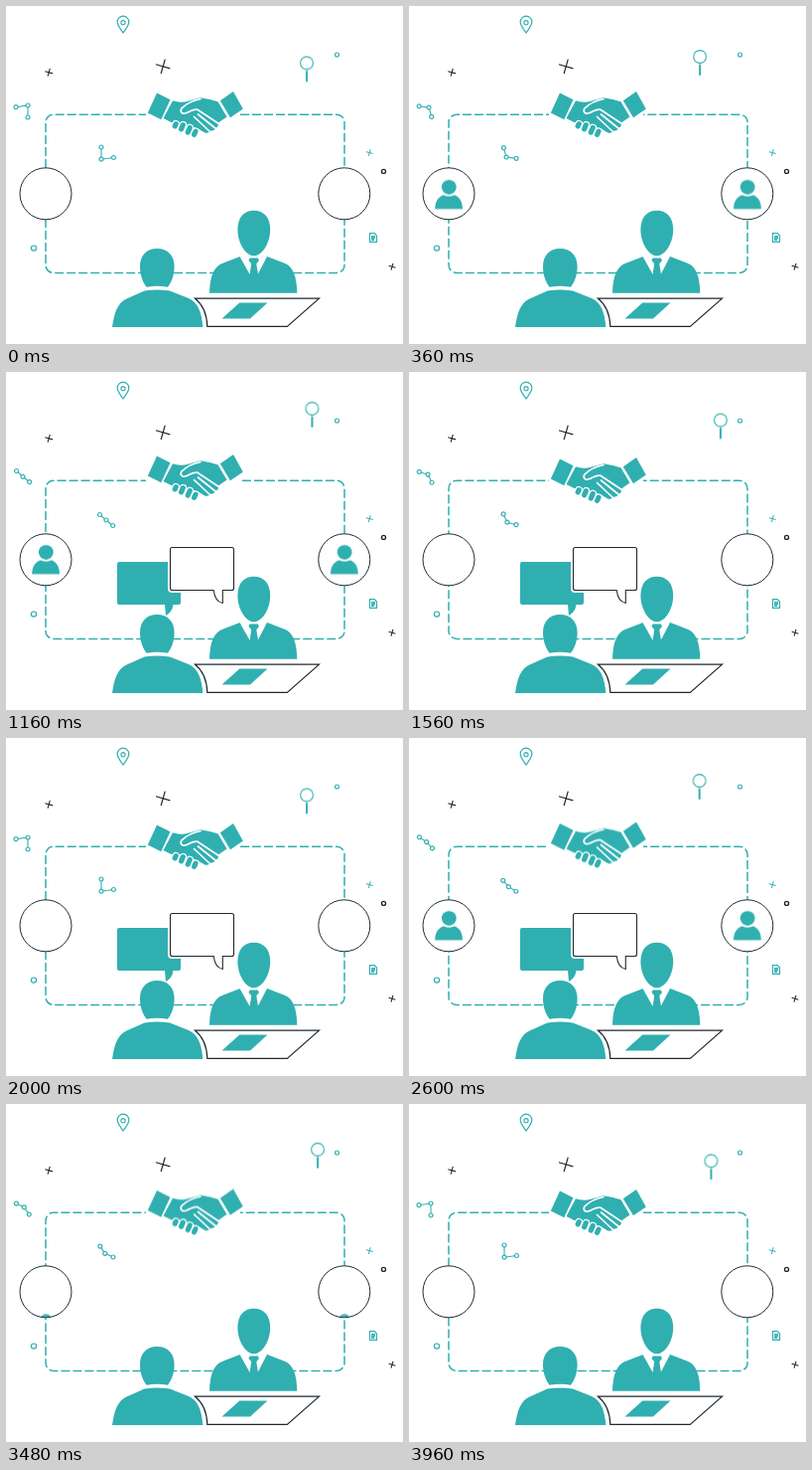
Recreate the animation shown at these times as an HTML page. Size 400x340 px, loop 4 s.

```html
<!DOCTYPE html>
<html lang="en">
<head>
<meta charset="utf-8">
<title>Meeting</title>
<style>
  html, body { margin: 0; width: 100%; height: 100%; overflow: hidden; background: #fff; }
  svg { display: block; width: 400px; height: 340px; }
  :root { --teal: #30afb1; --dark: #1f2a33; }

  .fill { fill: var(--teal); }
  .teal { fill: none; stroke: var(--teal); }
  .dark { fill: none; stroke: var(--dark); }
  .paper { fill: #fff; }
  .cut { fill: none; stroke: #fff; stroke-width: 1.7; stroke-linecap: round; stroke-linejoin: round; }

  .flow { stroke-width: 1.5; stroke-dasharray: 9 3; animation: flow 2s linear infinite; }
  @keyframes flow { to { stroke-dashoffset: -24px; } }

  .shake { animation: shake 2s ease-in-out infinite; }
  @keyframes shake {
    0%, 20%, 80%, 100% { transform: none; }
    40%, 60% { transform: translateY(-3px); }
  }

  .user { animation: user 2s ease-in-out infinite; }
  @keyframes user {
    0%, 80%, 100% { transform: translateY(46px); }
    20%, 60% { transform: translateY(0); }
  }

  .orbit { animation: turn 2s linear infinite; }
  .upright { animation: turn 2s linear infinite reverse; }
  @keyframes turn { to { transform: rotate(360deg); } }

  .link { stroke-width: 1.1; marker: url(#node); animation: 2s ease-in-out infinite; }
  .link.a { animation-name: bend-a; }
  .link.b { animation-name: bend-b; }
  @keyframes bend-a {
    0%, 100% { d: path("M10 101.7L22 100L22 112"); }
    40%, 60% { d: path("M10.5 99.5L17 105.3L23.7 110.7"); }
  }
  @keyframes bend-b {
    0%, 100% { d: path("M96 142L96 154.2L108.4 152.5"); }
    40%, 60% { d: path("M94.5 143.5L101 149L107.7 154.5"); }
  }

  .bubble { transform-box: fill-box; transform-origin: center; animation: 4s ease-out infinite; }
  .ask { animation-name: ask; }
  .reply { animation-name: reply; }
  @keyframes ask {
    0%, 13% { transform: scale(0); }
    20%, 73% { transform: scale(1); }
    80%, 100% { transform: scale(0); }
  }
  @keyframes reply {
    0%, 20% { transform: scale(0); }
    27%, 73% { transform: scale(1); }
    80%, 100% { transform: scale(0); }
  }
</style>
</head>
<body>
<svg viewBox="0 0 400 340">
  <defs>
    <marker id="node" markerUnits="userSpaceOnUse" markerWidth="8" markerHeight="8" refX="4" refY="4">
      <circle cx="4" cy="4" r="2" fill="#fff" stroke="#30afb1" stroke-width="1.2"/>
    </marker>
    <clipPath id="disc"><circle r="25.5"/></clipPath>
    <path id="plus" d="M-1 0H1M0 -1V1" vector-effect="non-scaling-stroke"/>
    <g id="person">
      <circle cx=".3" cy="-7.4" r="7.4"/>
      <path d="M-13.8 14.5C-13.8 6 -9.5 1.5 -5 .5Q.3 3.2 5.6 .5C10 1.5 14 6 14 14.5Z"/>
    </g>
    <path id="balloon" d="M167.5 176.5H227.5Q229.5 176.5 229.5 178.5V217.5Q229.5 219.5 227.5 219.5H218.3V232.5C213.5 231.5 210 227 209.3 219.5H167.5Q165.5 219.5 165.5 217.5V178.5Q165.5 176.5 167.5 176.5Z"/>
    <path id="fingers" d="M171.2 118.6L170.2 120.8M178.3 119.6L176.6 123.8M185.2 122.5L183.3 127M191 126.2L189.6 129.3"/>
  </defs>

  <!-- scattered icons -->
  <g class="teal">
    <path stroke-width="1.2" d="M118 27C115 22.5 112.2 19.5 112.2 16A5.8 5.8 0 0 1 123.8 16C123.8 19.5 121 22.5 118 27Z"/>
    <circle stroke-width="1.1" cx="118" cy="16.7" r="2.1"/>
    <circle stroke-width="1.1" cx="333.5" cy="49" r="2"/>
    <circle stroke-width="1.2" cx="28" cy="243.6" r="2.6"/>
    <path stroke-width="1.2" d="M366.5 228.6H371.2L373.5 231V237.4H366.5Z"/>
    <path stroke-width="1.4" d="M368 231.8H372M368 233.5H372M368 235.2H371"/>
    <use href="#plus" transform="translate(366.3 147.6) rotate(15) scale(3.5)"/>
    <path class="link a" d="M10 101.7L22 100L22 112"/>
    <path class="link b" d="M96 142L96 154.2L108.4 152.5"/>
  </g>
  <g class="dark">
    <circle stroke-width="1.4" cx="380.5" cy="166.4" r="2"/>
    <use href="#plus" stroke-width="1.1" transform="translate(43.2 66.8) rotate(16) scale(4)"/>
    <use href="#plus" stroke-width="1.2" transform="translate(158.2 60.8) rotate(16) scale(7.5)"/>
    <use href="#plus" stroke-width="1.1" transform="translate(389 262.2) rotate(16) scale(3.5)"/>
  </g>

  <g transform="translate(303.1 46.4)">
    <g class="orbit">
      <g transform="translate(0 11)">
        <g class="upright teal">
          <circle stroke-width="1.1" r="6.4"/>
          <path d="M0 6.4V9"/>
          <path stroke-width="2" d="M0 8.3V18.8"/>
        </g>
      </g>
    </g>
  </g>

  <!-- dashed frame and badges -->
  <path class="teal flow" d="M236 109.2H333A8 8 0 0 1 341 117.2V260.4A8 8 0 0 1 333 268.4H48A8 8 0 0 1 40 260.4V117.2A8 8 0 0 1 48 109.2H141"/>
  <g transform="translate(40 188.8)">
    <circle class="paper" r="26" stroke="#1f2a33"/>
    <g clip-path="url(#disc)"><use href="#person" class="user fill"/></g>
  </g>
  <g transform="translate(340.8 188.8)">
    <circle class="paper" r="26" stroke="#1f2a33"/>
    <g clip-path="url(#disc)"><use href="#person" class="user fill"/></g>
  </g>

  <!-- handshake -->
  <g class="shake fill">
    <path d="M152 87.5L165.5 94.3L156.3 114.2L142.8 107.5Z"/>
    <path d="M229 86L238.8 103.5L226 112.3L215.8 95.2Z"/>
    <path d="M168 95.3Q176 98 184 95.4L196 92.2Q206 93.5 213.5 96.2L222.5 111.5L213.5 117.8Q215 121 211.5 122.6Q210 126 206 125.6Q203.5 129 199.8 127.2L193 123L166 116.8L158.5 113Z"/>
    <path class="cut" d="M196 93.5C188 95 181 98.8 176.8 103.2C175 106.5 177.5 109 181 107.8C186 106 188 103.2 193 104.2L214.5 118.5"/>
    <path class="cut" d="M193.5 109L211 123M189.5 111.5L205 126"/>
    <g fill="none" stroke-linecap="round">
      <use href="#fingers" stroke="#fff" stroke-width="7.6"/>
      <use href="#fingers" stroke="#30afb1" stroke-width="5.2"/>
    </g>
  </g>

  <!-- speech bubbles -->
  <path class="bubble reply fill" d="M114 191H174Q176 191 176 193V232Q176 234 174 234H168.5Q167.5 241.5 161 245L160 234H114Q112 234 112 232V193Q112 191 114 191Z"/>
  <g class="bubble ask paper" stroke-linejoin="round">
    <use href="#balloon" stroke="#fff" stroke-width="5"/>
    <use href="#balloon" stroke="#1f2a33" stroke-width="1.1"/>
  </g>

  <!-- person behind the desk -->
  <g class="fill">
    <path d="M205 288.8C205.5 272 209 262 219 258.5L236.5 251.8H262.5L280 258.5C289.5 262 293 272 293.3 288.8Z"/>
    <path class="paper" d="M235.5 252L245.5 269.8H253.8L263 252L256 247H243Z"/>
    <path d="M245.6 253.4H253.8L255 256L252.3 259.2L254 269.9H245.6L247.2 259.2L244.5 256Z"/>
    <path d="M249.7 205.8C260 205.8 266.2 213 266.2 225C266.2 238.5 258 251.3 249.7 251.3C241.5 251.3 233.4 238.5 233.4 225C233.4 213 239.5 205.8 249.7 205.8Z"/>
  </g>

  <!-- desk -->
  <path class="paper" stroke="#1f2a33" stroke-width="1.2" d="M190.5 294.2H315.5L283.3 322.4H202.8C202.5 311 199 301 190.5 294.2Z"/>
  <path class="fill" d="M235.3 298.5H263.5L246 314.6H217.5Z"/>

  <!-- visitor -->
  <g class="fill">
    <path d="M107 323C109 308 112.5 298.5 121.5 294.4L139.5 286.4Q152.3 284.6 165 286.4L184 294C193 297.8 197 307 198.3 323Z"/>
    <path d="M152.2 244C163 244 169.6 251 169.6 262C169.6 270 167.3 277 163 282.8Q152.2 280.6 141.6 282.8C137.3 277 135 270 135 262C135 251 141.5 244 152.2 244Z"/>
  </g>
</svg>
</body>
</html>
```
